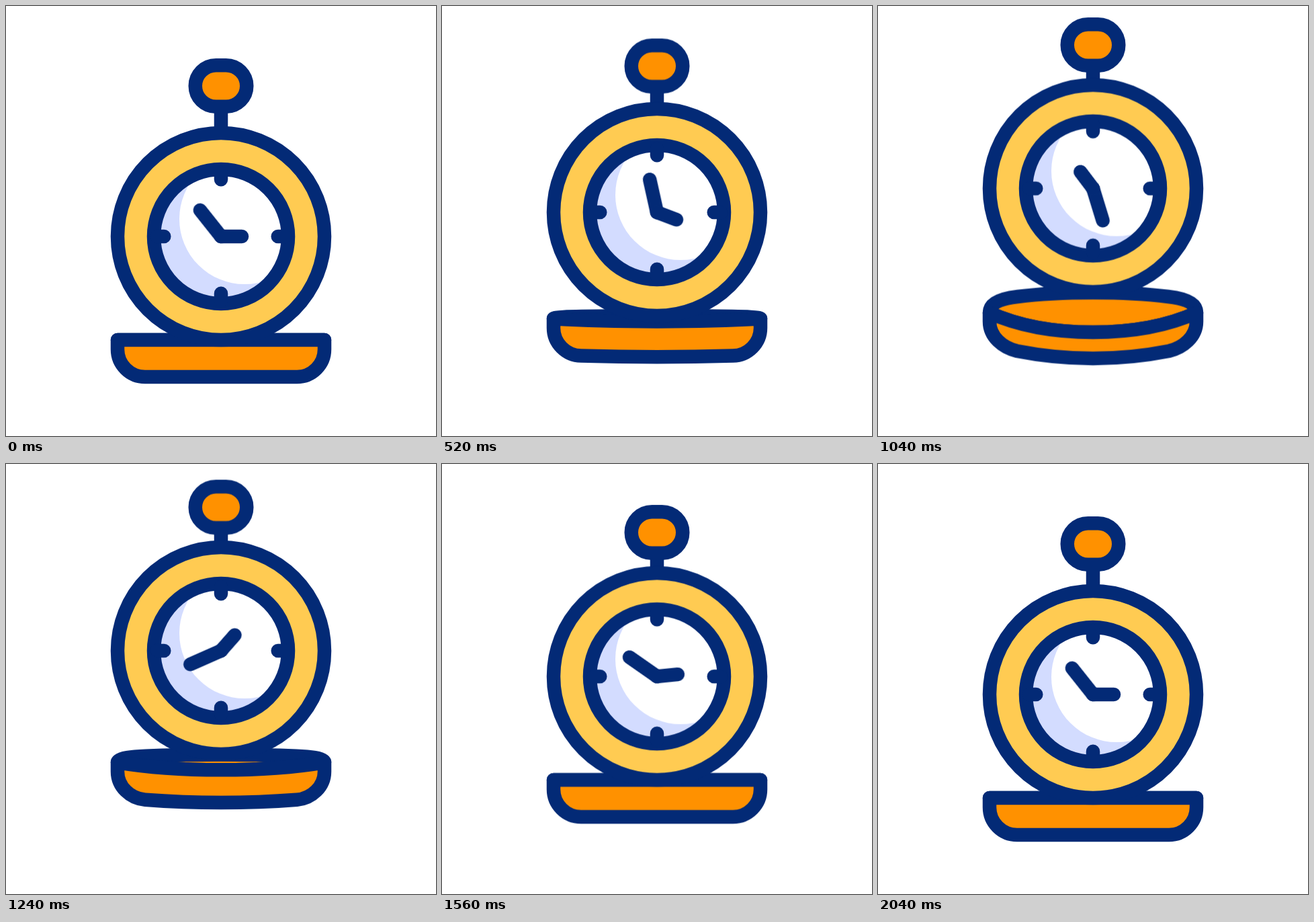
Write an HTML page that moves like this. It is 640 px wide and 640 px high and loops after 2.08 s.

```html
<!DOCTYPE html>
<html lang="en">
<head>
<meta charset="utf-8">
<title>Pocket watch</title>
<style>
  html, body { margin: 0; width: 100%; height: 100%; overflow: hidden; background: #fff; }
  svg { display: block; width: 100%; height: 100%; }

  .ink { stroke: #032a76; stroke-width: 20.5; stroke-linecap: round; stroke-linejoin: round; }
  .orange { fill: #ff9100; }
  .yellow { fill: #ffcb52; }
  .none { fill: none; }

  .watch, .knob, .hand, .lid { animation: 2080ms linear infinite; }
  .watch { animation-name: lift; }
  .knob { animation-name: press; }
  .hand { transform-origin: 320px 343px; }
  .minute { animation-name: minute; }
  .hour { animation-name: hour; }
  .lid { d: var(--shut); animation-name: lid; }

  .face {
    --shut: path("M166 497 C166 497 190 497 208 497 C240 497 285 497 320 497 C355 497 400 497 432 497 C450 497 474 497 474 497 C430 497 378 497 320 497 C262 497 210 497 166 497 Z");
    --open: path("M166 528 C166 511 190 506 208 504 C240 500 285 498 320 498 C355 498 400 500 432 504 C450 506 474 511 474 528 C432 547 378 557 320 557 C262 557 208 547 166 528 Z");
  }
  .bowl {
    --shut: path("M166 497 C210 497 262 497 320 497 C378 497 430 497 474 497 L474 511 C474 533.6 455.6 552 433 552 C395 552 357 552 320 552 C283 552 245 552 207 552 C184.4 552 166 533.6 166 511 Z");
    --open: path("M166 528 C208 547 262 557 320 557 C378 557 432 547 474 528 L474 541 C474 564 454 580 433 585 C395 592.5 357 596 320 596 C283 596 245 592.5 207 585 C186 580 166 564 166 541 Z");
  }

  @keyframes lift {
    0%, 1.92% { transform: translateY(0); animation-timing-function: cubic-bezier(.51, 0, .49, 1); }
    48.08% { transform: translateY(-71.6px); animation-timing-function: cubic-bezier(.525, 0, .475, 1); }
    96.15%, 100% { transform: translateY(0); }
  }
  @keyframes press {
    0%, 9.62% { transform: translateY(0); animation-timing-function: cubic-bezier(.33, 0, .67, 1); }
    36.54%, 71.15% { transform: translateY(10.5px); animation-timing-function: cubic-bezier(.33, 0, .67, 1); }
    94.23%, 100% { transform: translateY(0); }
  }
  @keyframes minute {
    0%, 1.92% { transform: rotate(-38.5deg); animation-timing-function: cubic-bezier(.645, 0, .355, 1); }
    94.23%, 100% { transform: rotate(321.5deg); }
  }
  @keyframes hour {
    0%, 6.25% { transform: rotate(90deg); animation-timing-function: cubic-bezier(.675, 0, .325, 1); }
    85.82%, 100% { transform: rotate(450deg); }
  }
  @keyframes lid {
    0%, 22.12% { d: var(--shut); animation-timing-function: cubic-bezier(.33, 0, .67, 1); }
    34.62%, 51.92% { d: var(--open); animation-timing-function: cubic-bezier(.33, 0, .67, 1); }
    65.38%, 100% { d: var(--shut); }
  }
</style>
</head>
<body>
<svg viewBox="0 0 640 640">
  <clipPath id="dial"><circle cx="320" cy="343" r="95"/></clipPath>
  <g class="watch">
    <g class="knob ink">
      <path d="M320 150V189"/>
      <rect class="orange" x="281.75" y="88.25" width="76.5" height="61.5" rx="30.75"/>
    </g>
    <path class="lid face ink orange"/>
    <path class="lid bowl ink orange"/>
    <circle class="ink yellow" cx="320" cy="343" r="154"/>
    <g clip-path="url(#dial)">
      <circle cx="320" cy="343" r="100" fill="#d3dcff"/>
      <circle cx="355" cy="317" r="97" fill="#fff"/>
    </g>
    <g class="ink none">
      <circle cx="320" cy="343" r="100"/>
      <path d="M320 248V258.3M320 438V427.7M225 343H235.3M415 343H404.7"/>
      <path class="hand minute" d="M320 343V293"/>
      <path class="hand hour" d="M320 343V312"/>
    </g>
  </g>
</svg>
</body>
</html>
```
